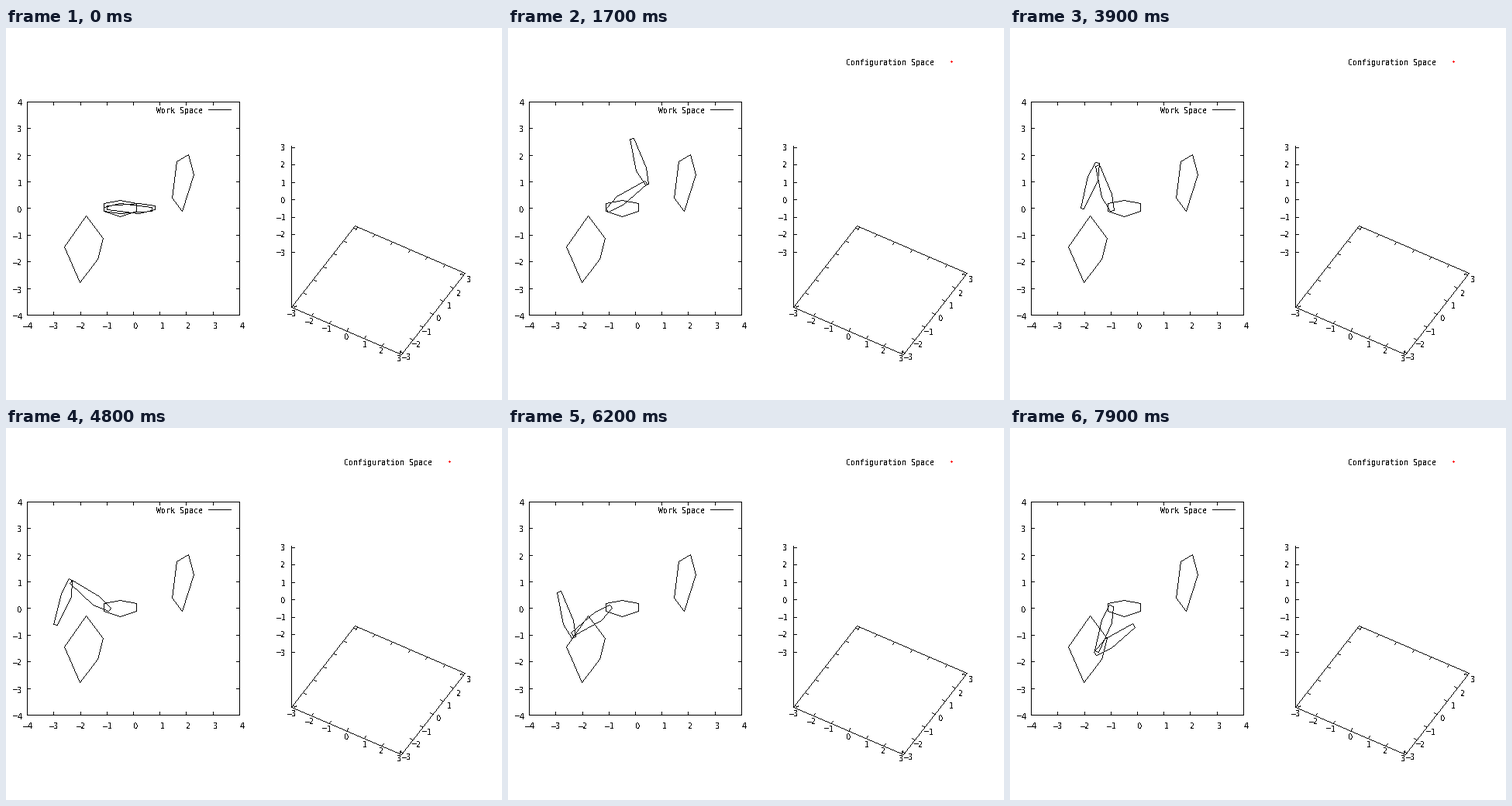
Write a matplotlib script that moves like this. It is 640 px wide and 480 px high and loops after 8000 ms.

```python
import numpy as np
import matplotlib.pyplot as plt
from matplotlib.animation import FuncAnimation

W, H, DPI = 640, 480, 80
BLACK, RED = (0, 0, 0), (255, 0, 0)
STEPS = 10
TURN = 2 * np.pi / STEPS

fig = plt.figure(figsize=(W / DPI, H / DPI), dpi=DPI, facecolor="white")
ax = fig.add_axes([0, 0, 1, 1])
ax.axis("off")


def stroke(img, points, color=BLACK):
    """Draw a polyline one pixel wide, without smoothing."""
    points = np.floor(np.asarray(points, float) + 0.5)
    for a, b in zip(points[:-1], points[1:]):
        n = int(np.abs(b - a).max())
        x, y = np.floor(np.linspace(a, b, n + 1) + 0.5).astype(int).T
        img[y, x] = color


def polygon(img, points):
    stroke(img, np.vstack([points, points[:1]]))


def label(text, x, y, family="DejaVu Sans Mono"):
    """Left edge at x, vertical middle at y."""
    return ax.text(x, y + 4, text, fontsize=10 * 72 / DPI, family=family,
                   va="baseline", ha="left", antialiased=False)


def number(v, x, y):
    """Two character cells starting at x, the sign cell first."""
    if v < 0:
        label("\u2212", x, y)
    label(str(abs(v)), x + 6, y, "DejaVu Sans")


def to_px(points):
    return np.asarray(points) * [34.3, -34.3] + [164.2, 232.6]


scene = np.full((H, W, 3), 255, np.uint8)
view = ax.imshow(scene, interpolation="nearest", aspect="auto",
                 extent=(-0.5, W - 0.5, H - 0.5, -0.5))

# Work space frame
L, T, R, B = 27, 95, 301, 370
polygon(scene, [(L, T), (R, T), (R, B), (L, B)])
for v in range(-4, 5):
    x = round(L + (v + 4) * (R - L) / 8)
    y = round(B - (v + 4) * (B - T) / 8)
    stroke(scene, [(x, T), (x, T + 4)])
    stroke(scene, [(x, B), (x, B - 4)])
    stroke(scene, [(L, y), (L + 4, y)])
    stroke(scene, [(R, y), (R - 4, y)])
    number(v, x - 6, 384)
    number(v, 8, y + 1)
label("Work Space", 194, 106)
stroke(scene, [(261, 105), (290, 105)])

# Obstacles and the fixed base
polygon(scene, [(103, 242), (125, 271), (118, 298), (95, 328), (75, 282)])
polygon(scene, [(220, 172), (235, 163), (242, 189), (227, 236), (214, 219)])
polygon(scene, to_px([(-1.1, .2), (-.5, .3), (.1, .2), (.1, -.1), (-.5, -.3), (-1.1, -.1)]))

# Configuration space: a tilted floor and a vertical axis, each from -pi to pi
origin = np.array([368, 360])
ex, ey = np.array([142, 61]), np.array([82, -105])
polygon(scene, [origin, origin + ex, origin + ex + ey, origin + ey])
stroke(scene, [(368, 152), origin])
tx, ty = 4 * ex / np.hypot(*ex), 4 * ey / np.hypot(*ey)
for v in range(-3, 4):
    f = (v + np.pi) / (2 * np.pi)
    px, py = origin + f * ex, origin + f * ey
    stroke(scene, [px, px + ty])
    stroke(scene, [px + ey, px + ey - ty])
    stroke(scene, [py, py + tx])
    stroke(scene, [py + ex, py + ex - tx])
    number(v, round(px[0]) - 9, round(px[1] + 6.5))
    number(v, round(py[0] + ex[0]) - 2, round(py[1] + ex[1] + 5.5))
    z = round(221.3 - 22.5 * v)
    stroke(scene, [(368, z), (372, z)])
    number(v, 348, z)
legend = label("Configuration Space", 436, 44)

# Two-link arm
LINK = np.array([(-.1, .05), (.5, .2), (1.7, .05), (1.7, -.1), (.5, -.2), (-.1, -.1)])
SHOULDER = np.array([-1, 0])


def draw_link(img, pivot, angle):
    """Draw a link and return the position of its far joint."""
    c, s = np.cos(angle), np.sin(angle)
    rot = np.array([(c, s), (-s, c)])
    polygon(img, to_px(LINK @ rot + pivot))
    return pivot + np.array([1.7, 0]) @ rot


def update(i):
    k, j = divmod(i, STEPS)
    img = scene.copy()
    elbow = draw_link(img, SHOULDER, k * TURN)
    draw_link(img, elbow, np.pi + (k + j) * TURN)
    legend.set_visible(i > 0)
    if i > 0:
        stroke(img, [(571, 43), (573, 43)], RED)
        stroke(img, [(572, 42), (572, 44)], RED)
    view.set_data(img)
    return view, legend


anim = FuncAnimation(fig, update, frames=80, interval=100, repeat=True,
                     repeat_delay=0, blit=False)
plt.show()
```
